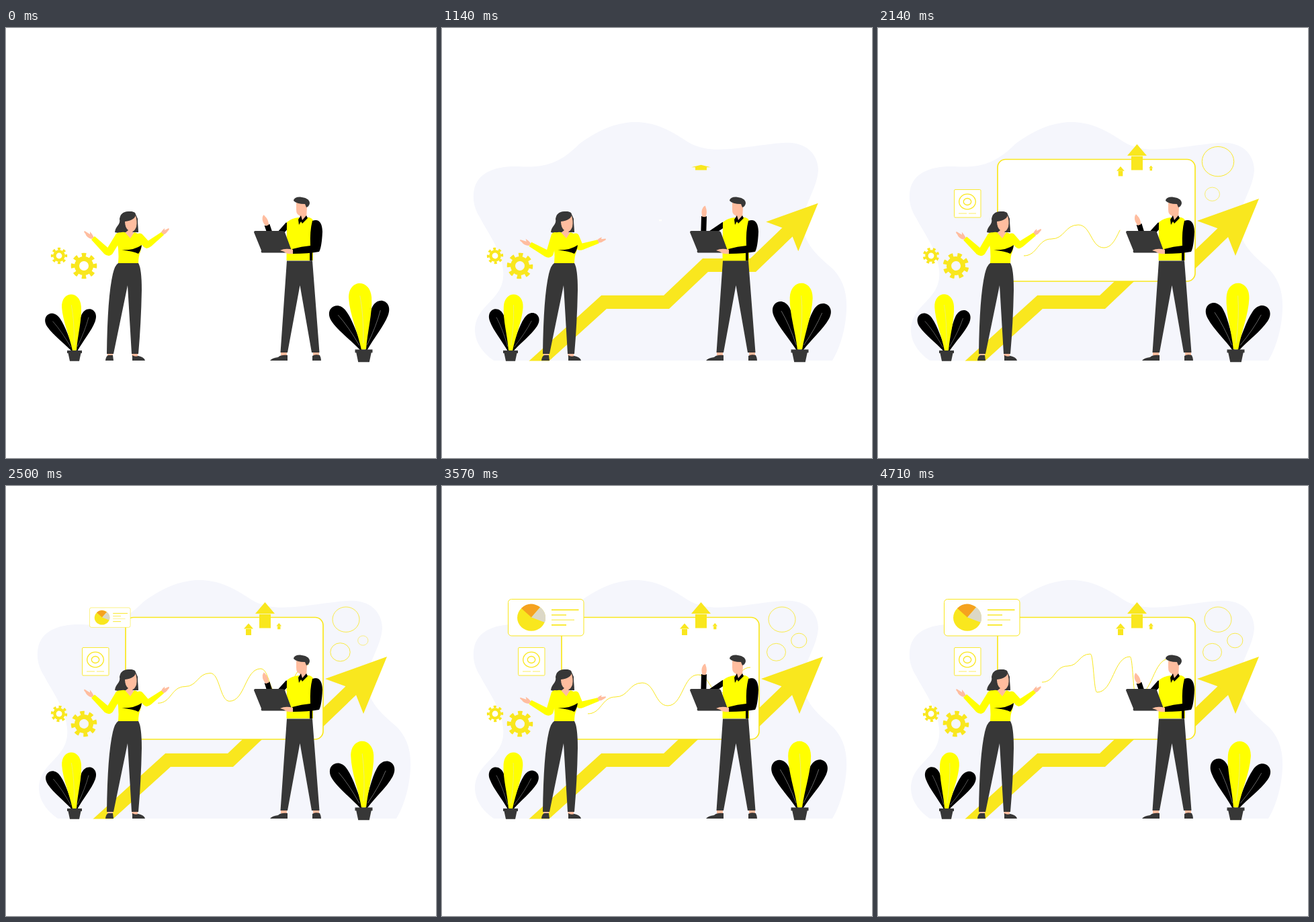
An HTML page that plays this animation: 640x640 px, repeating every 4780 ms.

```html
<!DOCTYPE html>
<html lang="en">
<head>
<meta charset="utf-8">
<title>Growth presentation</title>
<style>
  html, body { margin: 0; height: 100%; overflow: hidden; background: #fff; }
  svg { display: block; width: 100vw; height: 100vh; }
  .gold { fill: #f9e71e; }
  .line { fill: none; stroke: #f9e71e; }
  .panel { fill: #fff; stroke: #f9e71e; }
  .sun { fill: #ff0; }
  .sleeve { fill: none; stroke: #ff0; stroke-width: 11; stroke-linecap: round; }
  .dark { fill: #373737; }
  .skin { fill: #ffbd9f; }
  .vein { fill: none; stroke: #ddd; stroke-width: .6; opacity: .75; }
  .popup { transform-box: fill-box; transform-origin: center; }
  #upBig { transform-origin: bottom; }
</style>
</head>
<body>
<svg viewBox="0 0 640 640">
  <clipPath id="floor"><path d="M0 0H640V495.5H0Z"/></clipPath>

  <path id="blob" fill="#f5f6fc" d="M77 495C48 475 40 445 60 420C75 402 94 390 91 360C88 330 68 305 57 283C45 265 46 248 48 240C53 215 80 205 113 206C155 209 177 200 205 172C235 150 262 140 288 140C325 140 350 160 370 172C390 182 410 182 440 179C480 174 500 170 520 171C545 173 560 190 560 212C558 240 537 265 537 290C537 320 560 340 580 357C600 376 603 400 602 420C600 455 590 480 581 495Z"/>

  <path id="trend" class="line" clip-path="url(#floor)" stroke-width="20" pathLength="1" stroke-dasharray="1 2" d="M134 505L241 408H334L392 353H463L516 302"/>
  <path id="trendHead" class="gold popup" d="M475 287L567 254L532 339L521 311L505 298Z"/>

  <rect id="board" class="panel popup" stroke-width="1.7" x="178" y="195.5" width="294" height="181.5" rx="12"/>
  <path id="chart" class="line" pathLength="1" stroke-dasharray="1 2"/>

  <g id="badge" class="popup">
    <rect class="panel" stroke-width=".9" x="113.5" y="240.5" width="39.5" height="41.5" rx="1.5"/>
    <g class="line" stroke-width="1.3">
      <ellipse cx="133" cy="258.5" rx="12.3" ry="11.3"/>
      <ellipse cx="133" cy="258.5" rx="5.7" ry="5"/>
      <path stroke-width=".7" d="M120 276H132M135 276H146"/>
    </g>
  </g>

  <g id="card" class="popup">
    <rect class="panel" x="98.5" y="168.5" width="112.5" height="54.5" rx="5"/>
    <ellipse class="gold" cx="133" cy="196" rx="21" ry="19.7"/>
    <path fill="#f5a21f" d="M133 195.5L118 182Q131 170 146 180.5Z"/>
    <path fill="#dcd8c6" d="M133 195.5L146 180.5Q157 189 153 203Z"/>
    <g class="line">
      <path stroke-width="1.8" d="M163 184.3H203.5M163 206.8H185"/>
      <path stroke-width="1.4" d="M163 192H185"/>
      <path stroke-width=".9" d="M163 199.3H197"/>
    </g>
  </g>

  <path id="upBig" class="gold popup" d="M371 190L385.5 173L400 190ZM377 190.7H394V211.5H377Z"/>
  <path id="upMid" class="gold popup" d="M354 212.5L361 204.5L368 212.5ZM357 213H365V222H357Z"/>
  <path id="upSmall" class="gold popup" d="M402.5 208.5L406.3 204L410 208.5ZM404.2 208.8H408.4V213.2H404.2Z"/>
  <g class="line" stroke-width=".8">
    <ellipse id="ringA" class="popup" cx="506" cy="198.7" rx="20" ry="18.7"/>
    <ellipse id="ringB" class="popup" cx="497.5" cy="247.3" rx="14" ry="13"/>
    <ellipse id="ringC" class="popup" cx="531.3" cy="230" rx="11.6" ry="10.8"/>
  </g>

  <g id="gears"></g>
  <g id="plants"></g>

  <g id="woman">
    <path class="dark" d="M192 275C185 271 171 273 169 284C171 293 163 294 162 304Q168 306 180 304H197C197 297 196 293 196 284Z"/>
    <path class="skin" d="M177 288L192 277Q196 287 194 296Q191 303 188 303L191 306L185 314L177 305L182 301Q177 297 177 288Z"/>
    <path class="dark" d="M170 281Q172 273 183 273Q192 273 193 278Q192 286 177 288Q171 289 170 281Z"/>
    <g id="armL">
      <path class="skin" d="M131 312Q128 306 125 303L125 307L117 302Q115 303 118 306Q120 312 127 314Z"/>
      <path class="sleeve" d="M168 310L154 333"/>
      <path class="sun" d="M132 310L155 330Q160 337 153 339Q149 339 146 336L127 315Z"/>
    </g>
    <g id="armR">
      <path class="skin" d="M230 306Q232 301 236 298L236 301L242 298Q244 299 241 302Q238 307 233 308Z"/>
      <path class="sleeve" d="M199 311L209 322"/>
      <path class="sun" d="M231 304L208 319Q203 324 209 328Q212 328 216 325L235 308Z"/>
    </g>
    <path class="sun" d="M163 307Q170 303 177 304L185 313L191 304Q198 306 202 312Q203 324 200 333Q197 340 197 350H167Q168 340 167 328Z"/>
    <path d="M172 330.5Q191 331 202 323Q201 331 197 336Q190 332 172 330.5Z"/>
    <path class="dark" d="M167 350H197Q202 358 202 390Q201 440 197 485H187L181 383L160 485H150Q151 400 159 366Q162 353 167 350Z"/>
    <path class="skin" d="M151 485H159V488H151ZM187.5 485H196V489H187.5Z"/>
    <path class="dark" d="M148 495Q149 487 153 487H159L160 495ZM188 487Q192 490 197 488Q206 490 207 495H188Z"/>
  </g>

  <g id="man">
    <path id="sleeve" fill="none" stroke="#000" stroke-width="8" stroke-linejoin="round"/>
    <path id="hand" class="skin" d="M-2.500 1Q-5 -7 -3 -11Q-2 -14 0 -15Q1 -17 2 -13Q5 -7 2.500 1Z"/>
    <path class="skin" d="M432 260L445 261L448 267L447 284L440 291L437 279Q432 278 432 270Z"/>
    <path class="sun" d="M418 289Q425 283 436 282L440 287L447 282Q453 281 457 286V346H417.5Z"/>
    <path d="M435 285L439 279L441 286L447 279L449 283L441 291L439 288L436 293ZM452 333H456V346.5H452Z"/>
    <path class="dark" d="M428 257Q429 251 438 251.5Q452 253 452 261Q451 266 447 267L445 262Q432 262 428 257Z"/>
    <path d="M456 287Q470 282 471 303Q470 326 466 333Q450 336 427 336L426 329Q440 325 453 324Q452 302 456 287Z"/>
    <path class="dark" d="M371 302H411Q414 302 415 304L425 331Q425 334.5 422 334.5H381Q379 334 380 331L369 304Q369 302 371 302Z"/>
    <path class="skin" d="M408 331Q416 327 427 330V336Q418 337 414 333Z"/>
    <path class="dark" d="M418 346.5H456L466.5 483H455L437.5 383L419 483H408.5Z"/>
    <path class="skin" d="M409 483H418V487.5H409ZM457 483H466V487H457Z"/>
    <path class="dark" d="M393 495Q396 491 405 490Q409 486 419 487V495ZM456 495V488Q460 485 467 487Q469 491 469 495Z"/>
  </g>
</svg>
<script>
const LOOP = 4780, GROW = 640, SETTLE = 150, WAVE = 1170;
const $ = id => document.getElementById(id);
const clamp = x => Math.min(1, Math.max(0, x));
const mix = (a, b, k) => a + (b - a) * k;
const ease = x => (1 - Math.cos(Math.PI * clamp(x))) / 2;
const ramp = (t, from, to) => ease((t - from) / (to - from));

// Swings 0 -> 1 -> 0 -> 1 ... through the given times, then holds.
function swing(t, times) {
  const next = times.findIndex(time => t < time);
  if (next < 0) return (times.length - 1) % 2;
  const k = ramp(t, times[next - 1] ?? 0, times[next]);
  return next % 2 ? k : next && 1 - k;
}

// Grows to 125 % and settles at 100 %.
const pop = age => 1.25 * clamp(age / GROW) - .25 * clamp((age - GROW) / SETTLE);

const popupStart = {
  trendHead: 710, upBig: 1038, board: 1134, badge: 1278, ringA: 1534,
  upMid: 1715, upSmall: 1725, ringB: 1740, ringC: 2165, card: 2225,
};

const gear = (x, y, scale) => `
  <g transform="translate(${x} ${y}) scale(${scale})"><g class="line gear">
    <circle r="10.5" stroke-width="7"/>
    <circle r="16.3" stroke-width="6" pathLength="16" stroke-dasharray="1 1" stroke-dashoffset=".5"/>
  </g></g>`;
$('gears').innerHTML = gear(79, 339, .63) + gear(116, 354, 1);

// Each plant has two side leaves and a middle one in front.
const sides = [-1, 1, 0];
const leaf = side => `
  <g transform="translate(${side * 2}) scale(${side ? .78 : 1})"><g class="leaf">
    <path fill="${side ? '#000' : '#ff0'}" d="M-3 0C-6 -22 -14.400 -45 -14.400 -65C-14.400 -90 14.400 -90 14.400 -65C14.400 -45 6 -22 3 0Z"/>
    <path class="vein" d="M0 -8Q3 -42 0 -68"/>
  </g></g>`;
const plant = (x, y, scale) => `
  <g transform="translate(${x} ${y}) scale(${scale})">${sides.map(leaf).join('')}
    <path class="dark" d="M-11 0H11V4H-11ZM-9.500 4H9.500L7 15.800H-7Z"/>
  </g>`;
$('plants').innerHTML = plant(102, 480, 1) + plant(532.5, 478.5, 1.18);

function leafAngle(t, i) {
  const side = sides[i % 3], peak = (i < 3 ? 1300 : 1800) * (1 + side / 9);
  const sway = swing(t, [0, peak, peak + 1100, peak + 2500]);
  return 28 * side + (side ? 7 : 4) * (2 * sway - 1);
}

// Turning points of the chart: x, y, and the shift of each when it rises.
const turns = [
  [217, 339, 27, -47], [258, 314, 24, -46], [298, 293, 18, -43], [336, 327, -10, -20],
  [381, 281, -6, -27], [415, 308, -31, 4], [459, 270, -25, -13],
];
function chartPath(rise) {
  const points = turns.map(([x, y, dx, dy]) => [x + dx * rise, y + dy * rise]);
  return points.map(([x, y], i) => {
    if (!i) return `M${x} ${y}`;
    const [px, py] = points[i - 1], mid = (px + x) / 2;
    return `C${mid} ${py} ${mid} ${y} ${x} ${y}`;
  }).join('');
}

function reveal(id, t, from, to) {
  $(id).style.strokeDashoffset = 1 - ramp(t, from, to);
  $(id).style.visibility = t > from ? 'visible' : 'hidden';
}

const gearNodes = document.querySelectorAll('.gear');
const leafNodes = document.querySelectorAll('.leaf');
const move = (node, value) => node.setAttribute('transform', value);

function draw(t) {
  $('blob').style.opacity = ramp(t, 0, 500);
  reveal('trend', t, 50, 1000);
  reveal('chart', t, 1800, 2420);
  $('chart').setAttribute('d', chartPath(swing(t, [2320, 2780, 3560, 4500].map((v, i) => v))));

  for (const [id, start] of Object.entries(popupStart)) {
    const s = pop(t - start);
    $(id).style.transform = `scale(${id === 'upBig' ? 1 : s}, ${s})`;
    $(id).style.visibility = s > 0 ? 'visible' : 'hidden';
  }

  gearNodes.forEach((node, i) => move(node, `rotate(${(i ? -360 : 360) * t / LOOP})`));
  leafNodes.forEach((node, i) => move(node, `rotate(${leafAngle(t, i)})`));

  const wave = swing(t, [0, WAVE, 2 * WAVE, 3 * WAVE, 4 * WAVE - 100]);
  move($('armL'), `rotate(${-15 * wave} 166 310)`);
  move($('armR'), `rotate(${20 * wave} 199 310)`);
  const elbow = [mix(397, 389, wave), mix(318, 313, wave)];
  const wrist = [mix(388.5, 390, wave), mix(293, 280, wave)];
  $('sleeve').setAttribute('d', `M420 292L${elbow}L${wrist}`);
  move($('hand'), `translate(${wrist}) rotate(${mix(-22, 3, wave)})`);
}

const start = performance.now();
function tick() {
  draw((performance.now() - start) % LOOP);
  requestAnimationFrame(tick);
}
tick();
</script>
</body>
</html>
```
